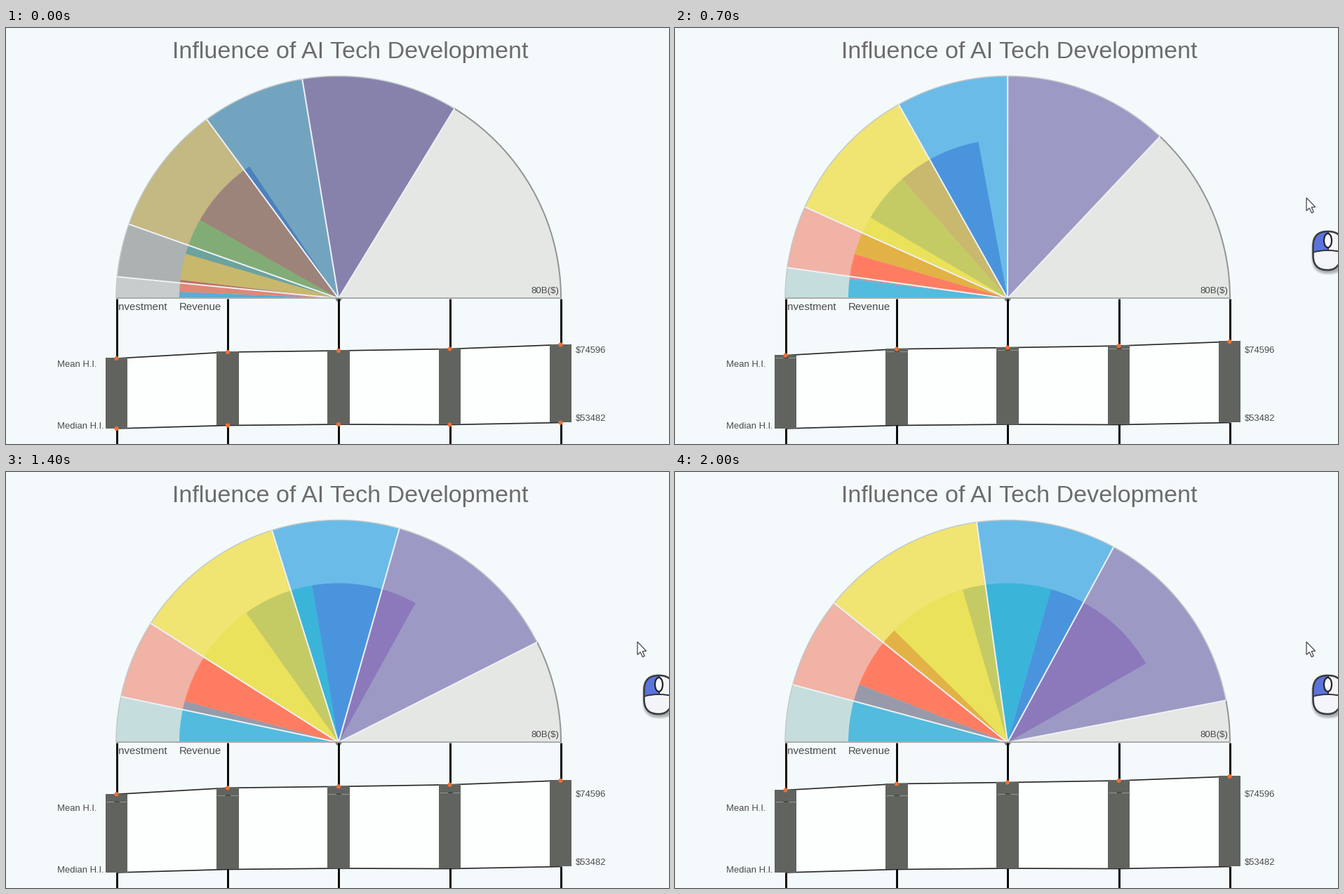
Animation, 945 px wide and 593 px high, one loop 2100 ms. Source, as a matplotlib script:

```python
import numpy as np
import matplotlib.pyplot as plt
from matplotlib.animation import FuncAnimation
from matplotlib.colors import to_rgb
from matplotlib.patches import Arc, Circle, Ellipse, FancyBboxPatch, Polygon, Rectangle, Wedge

W, H, DPI = 945, 593, 100
STEP, FRAMES = 100, 21
PX = 72 / DPI
CX, CY, R_OUT, R_IN = 474, 385.5, 317, 227

# Cumulative angles in degrees, swept clockwise from the left: start, end
INVEST = np.array([(0, 0), (5.6, 15.05), (19.5, 38.8), (53.65, 82), (80.6, 118.5), (121.4, 169.1)])
REVENUE = np.array([(0, 0), (2.4, 21.4), (6.7, 44.7), (16.3, 73.6), (29.5, 105.9), (55.95, 150.3)])

# Bright colours, and the muted ones shown before the click
BRIGHT = ["#c5dedd", "#f0b3a5", "#f0e472", "#6bbbe8", "#9c9ac4"]
MUTED = ["#c8cccd", "#abb2b1", "#c4b883", "#73a4bf", "#8682ac"]
# (investment, revenue) overlaps
CELL = {
    (0, 0): "#52bbde", (0, 1): "#c8968f", (1, 0): "#989aaa", (1, 1): "#fe7d62",
    (1, 2): "#e2b246", (1, 3): "#a09b91", (2, 1): "#e2b246", (2, 2): "#eae25a",
    (2, 3): "#c5cb64", (2, 4): "#c8b96e", (3, 3): "#3ab5d9", (3, 4): "#4a94de",
    (4, 3): "#4a94de", (4, 4): "#8b79bb",
}
CELL_MUTED = {
    (0, 0): "#5aacd4", (0, 1): "#e08776", (1, 1): "#be6e64", (1, 2): "#c8b86c",
    (1, 3): "#6ba39e", (2, 3): "#82ac76", (2, 4): "#9d847a", (3, 4): "#4c81be",
}

BAR_X = [157.5, 316, 474, 632.5, 790.5]
MEAN = np.array([471, 462, 460, 457.5, 451.5])
MEDIAN = np.array([571, 566.5, 565, 565.5, 562.5])
BAR_HALF = 15.7
RISE = 17.5

# The small margin keeps the pixel size from rounding down
fig = plt.figure(figsize=((W + 0.01) / DPI, (H + 0.01) / DPI), dpi=DPI, facecolor="#f4fafb")
ax = fig.add_axes([0, 0, 1, 1])


def blend(a, b, k):
    return tuple(np.array(to_rgb(a)) * (1 - k) + np.array(to_rgb(b)) * k)


def fill(patch, color, z, edge="none", lw=0, **kw):
    patch.set(facecolor=color, edgecolor=edge, linewidth=lw * PX, zorder=z, **kw)
    return ax.add_patch(patch)


def line(xs, ys, color, lw, z):
    ax.plot(xs, ys, color=color, lw=lw * PX, zorder=z, solid_capstyle="butt")


def text(x, y, s, size, color="#4a4a4a", ha="left"):
    ax.text(x, y, s, fontsize=size * PX, color=color, ha=ha, va="baseline",
            family="Liberation Sans", zorder=6)


def sector(r, a, b, color, z):
    fill(Wedge((CX, CY), r, 180 + a, 180 + b), color, z)


def rim(a, b, color, lw):
    t = np.radians(np.linspace(a, b, 120))
    line(CX - R_OUT * np.cos(t), CY - R_OUT * np.sin(t), color, lw, 4)


def fan(u, k):
    inv = INVEST[:, 0] + (INVEST[:, 1] - INVEST[:, 0]) * u
    rev = REVENUE[:, 0] + (REVENUE[:, 1] - REVENUE[:, 0]) * u
    sector(R_OUT, 0, 180, "#e5e7e5", 1)
    for i in range(5):
        sector(R_OUT, inv[i], inv[i + 1], blend(MUTED[i], BRIGHT[i], k), 2)
    for (i, j), c in CELL.items():
        a, b = max(inv[i], rev[j]), min(inv[i + 1], rev[j + 1])
        if b - a > 0.02:
            sector(R_IN, a, b, blend(CELL_MUTED.get((i, j), c), c, k), 3)
    rim(0, inv[5], "#c3c9ca", 1.5)
    rim(inv[5], 180, "#929594", 2)
    for a in np.radians(inv[1:]):
        line([CX, CX - R_OUT * np.cos(a)], [CY, CY - R_OUT * np.sin(a)], "#eef1f5", 2, 4)
    line([CX - R_OUT, CX + R_OUT], [CY, CY], "#a9adac", 2, 4)
    fill(Wedge((CX, CY), 4.5, 0, 180), "#7c7f7e", 5)


def bars(u, bottom_dots):
    top = MEAN - RISE * u
    area = list(zip(BAR_X, top)) + list(zip(BAR_X, MEDIAN))[::-1]
    fill(Polygon(area), "#fdfefe", 1)
    line(BAR_X, top, "#2a2a2a", 1.7, 2)
    line(BAR_X, MEDIAN, "#2a2a2a", 1.7, 2)
    for n, (x, y, y2) in enumerate(zip(BAR_X, top, MEDIAN)):
        line([x, x], [CY + 1, y], "#0c0c0c", 3, 7)
        line([x, x], [y2, H], "#0c0c0c", 3, 2)
        fill(Rectangle((x - BAR_HALF, y - 0.7), 2 * BAR_HALF, y2 - y + 0.7), "#61635f", 3)
        if RISE * u > 2 and n < 4:
            mark = MEAN[n] - 0.5
            for s in (-1, 1):
                line([x + s * 4, x + s * 15], [mark, mark], "#969894", 1, 4)
            line([x - 3, x + 3], [mark, mark], "#40423f", 1.5, 4)
        fill(Circle((x, y), 3.1), "#ee7034", 8)
        if bottom_dots:
            fill(Circle((x, y2), 3.1), "#ee7034", 8)


def labels():
    text(491, 43, "Influence of AI Tech Development", 34.1, "#6c6c6c", "center")
    text(156.5, 402, "Investment", 15)
    text(247, 402, "Revenue", 15)
    text(788, 378, "80B($)", 13.2, ha="right")
    text(73, 483, "Mean H.I.", 13)
    text(73, 571, "Median H.I.", 13)
    text(812, 463, "$74596", 13)
    text(812, 560, "$53482", 13)


def capsule(dx=0, dy=0, grow=0):
    x, y, w, h = 909.5 + dx - grow, 290 + dy - grow, 42 + 2 * grow, 55 + 2 * grow
    return FancyBboxPatch((x, y), w, h, boxstyle=f"round,pad=0,rounding_size={w / 2 - 0.5}")


def mouse_icon():
    for g in (4, 3, 2, 1, 0):
        fill(capsule(1, 3, g), "#404448", 9, alpha=0.1)
    body = fill(capsule(), "#f4f5f8", 10)
    left = fill(Rectangle((905, 285), 25.5, 33), "#5a74dc", 11)
    left.set_clip_path(body)
    seam = ax.add_patch(Arc((930.5, 325), 54, 16, theta1=180, theta2=360,
                            color="#33363c", lw=2 * PX, zorder=12))
    seam.set_clip_path(body)
    line([930.5, 930.5], [290, 317], "#33363c", 2, 12)
    fill(Ellipse((930.5, 303), 11, 20), "#f8f8fa", 13, "#22242a", 2.2)
    fill(capsule(), "none", 14, "#3a3c40", 2.6)


def pointer():
    pts = [(900, 242), (900, 260.5), (904.2, 256.7), (907.4, 263.6),
           (910.2, 262.3), (907.2, 255.6), (912.6, 255.2)]
    fill(Polygon(pts), "#fdfdfd", 16, "#4a4a50", 1.3)


def ring(t):
    r = np.interp(t, [200, 300, 400], [15, 23, 27])
    a = np.interp(t, [200, 300, 400], [1, 1, 0.35])
    fill(Circle((899.5, 242), r), "#f1f3fb", 14, "#9294d0", 4, alpha=a)


def draw(n):
    t = n * STEP
    ax.cla()
    ax.set(xlim=(0, W), ylim=(H, 0))
    ax.axis("off")
    u = np.interp(t, [0, 200, 300, 700, 1100, 1400, 1600, 2000],
                  [0, 0.004, 0.036, 0.249, 0.487, 0.667, 0.793, 1])
    fan(u, min(t / 300, 1))
    bars(u, t < 200)
    labels()
    if t >= 100:
        mouse_icon()
        pointer()
    if 200 <= t <= 400:
        ring(t)
    return []


anim = FuncAnimation(fig, draw, frames=FRAMES, interval=STEP, init_func=lambda: draw(0),
                     repeat=True, repeat_delay=0, blit=False)
plt.show()
```
